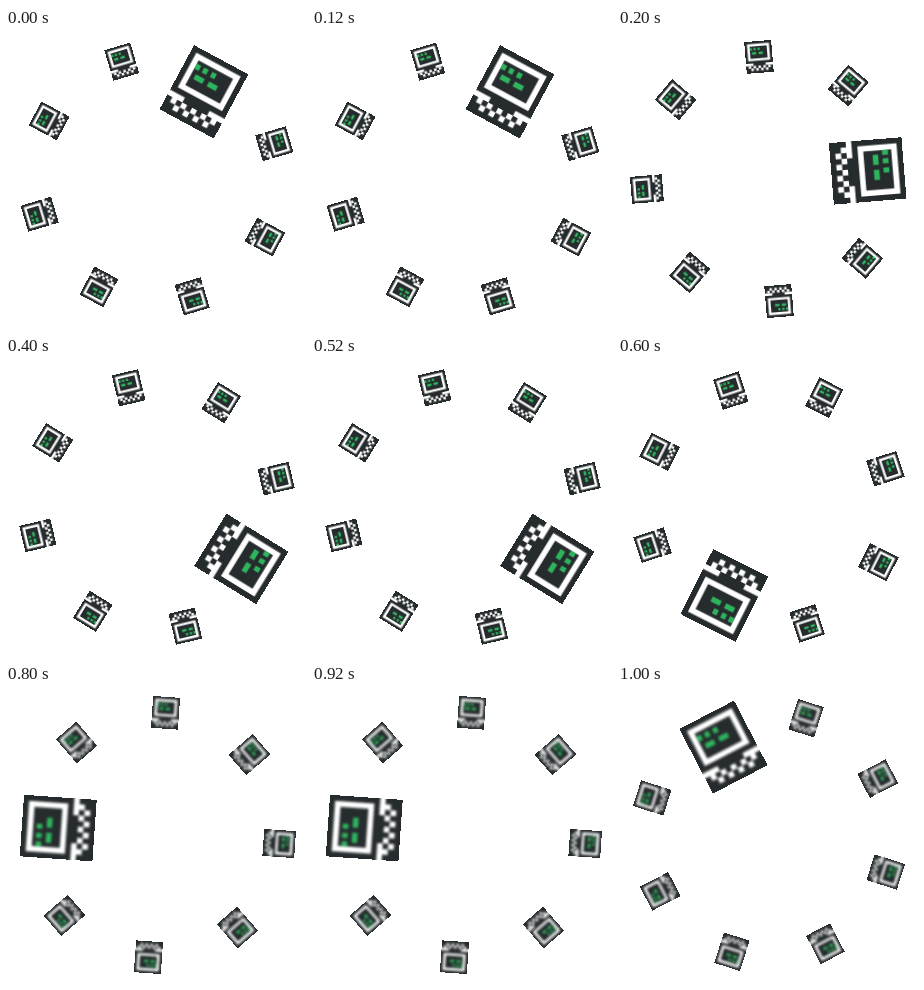
Animation of 300 by 300 pixels, one loop 1200 ms. Source, as an HTML page:

```html
<!DOCTYPE html>
<html lang="en">
<head>
<meta charset="utf-8">
<title>Computer ring</title>
<style>
  html, body { margin: 0; height: 100%; overflow: hidden; background: #fff; }
  svg { display: block; width: 100%; height: 100%; }
  .details { filter: blur(var(--blur)); }
</style>
</head>
<body>
<svg viewBox="0 0 300 300">
  <defs>
    <!-- 11 x 13 pixel computer, centred on the origin -->
    <g id="computer" transform="translate(-5.5 -6.5)">
      <path fill="#262b2d" shape-rendering="crispEdges" d="M0 0h11v13h-11z"/>
      <g class="details" stroke="#fff" fill="none">
        <path d="M1.5 1.5h8v6h-8z"/>
        <path d="M-1 9.5h4M8 9.5h4"/>
        <path stroke-dasharray="1" d="M1 10.5h9M2 11.5h7"/>
        <path stroke="#2fb45e" d="M2 3.15h.9M3.5 3.15h.9M5.15 3.15h.9M2.75 4.9h1.8M5.45 4.9h1.8"/>
      </g>
    </g>
  </defs>
  <g id="ring"></g>
</svg>
<script>
const COUNT = 8, STEP = 200;
// Direction of the large computer at each step, in degrees from the top
const turns = [28.3, 85.3, 121.6, 206.8, 274, 332.6];

const ring = document.getElementById('ring');
const icons = Array.from({ length: COUNT }, () => {
  const icon = document.createElementNS('http://www.w3.org/2000/svg', 'use');
  icon.setAttribute('href', '#computer');
  return ring.appendChild(icon);
});

function draw(time) {
  const step = Math.floor(time / STEP) % turns.length;
  const blur = 0.4 + 0.1 * step; // details soften with every turn
  icons.forEach((icon, i) => {
    const [radius, scale] = i ? [122.5, 2.45] : [99, 5.6];
    const angle = turns[step] + i * 360 / COUNT;
    icon.style.setProperty('--blur', `${blur / scale}px`);
    icon.setAttribute('transform',
      `translate(151 151) rotate(${angle}) translate(0 ${-radius}) scale(${scale})`);
  });
}

function tick(now) {
  draw(Math.max(0, now));
  requestAnimationFrame(tick);
}
draw(0);
requestAnimationFrame(tick);
</script>
</body>
</html>
```
